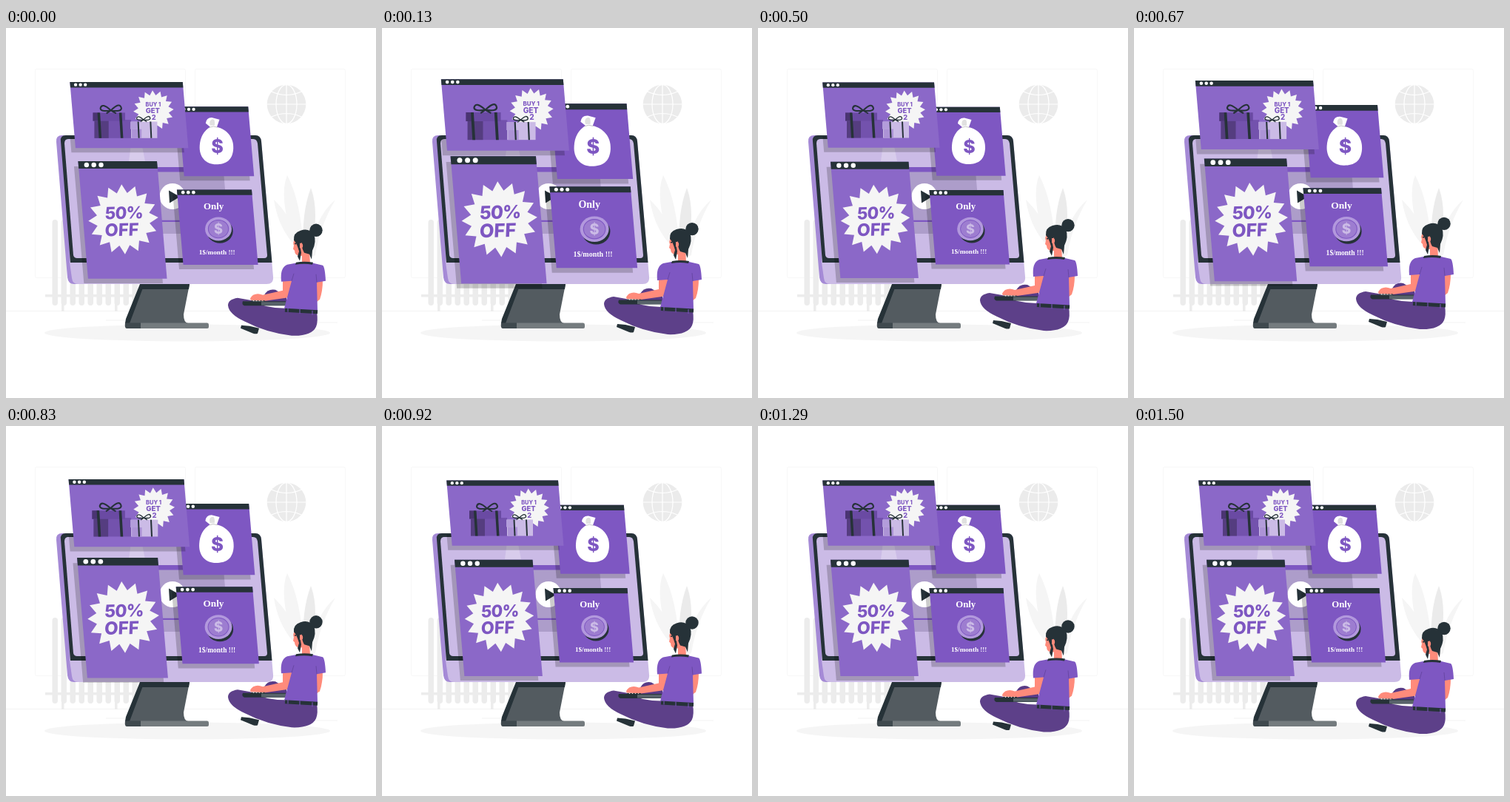
An HTML page for the animation above (1540 ms loop, 500x500 px).

```html
<!DOCTYPE html>
<html lang="en">
<head>
<meta charset="utf-8">
<style>
  html, body { margin: 0; width: 100%; height: 100%; overflow: hidden; background: #fff; }
  svg { display: block; width: 100vw; height: 100vh; }
  .bold { font: 800 23px Inter, sans-serif; fill: #7e57c2; text-anchor: middle; }
  .serif { font: 700 12.8px "Liberation Serif", serif; fill: #fff; text-anchor: middle; }
  .dark { fill: #263238; }
  .line { fill: none; stroke: #263238; stroke-width: 2; }
</style>
</head>
<body>
<svg viewBox="0 0 500 500">
  <!-- room -->
  <g fill="none" stroke="#f7f7f7">
    <rect x="39.5" y="55.5" width="203" height="282" rx="2"/>
    <rect x="255.5" y="55.5" width="203" height="282" rx="2"/>
    <path stroke="#ebebeb" stroke-width=".6" d="M0 382.5H500M135 395h38M396 398h52"/>
  </g>
  <circle cx="379" cy="103" r="26.3" fill="#ebebeb"/>
  <g fill="none" stroke="#fff" stroke-width="1.2">
    <path d="M379 76V130M352 103H406M359 86Q379 95 399 86M359 120Q379 111 399 120"/>
    <ellipse cx="379" cy="103" rx="14" ry="26.3"/>
  </g>
  <g id="radiator" fill="#ececec"><path d="M53 360H174V363.5H53zM75 372h3.5v11H75zM147 372h3.5v11H147z"/></g>
  <path fill="#f5f5f5" d="M380 199Q368 228 389 290L402 300Q399 235 380 199zM362 232Q367 266 387 290L392 281Q384 253 362 232zM445 232Q415 258 410 310L418 307Q424 268 445 232z"/>
  <path fill="#ebebeb" d="M412 216Q399 250 402 300H412Q424 249 412 216z"/>
  <ellipse cx="245" cy="412" rx="193" ry="11.5" fill="#f5f5f5"/>

  <!-- monitor -->
  <path fill="#535b60" d="M184 346H248L240 387Q240 398 246 399H161L163 394z"/>
  <path class="dark" d="M181 346H187L167 399H161L162 393zM186 346H248L247 353H184z"/>
  <path fill="#3f494e" d="M161 398.500H182V406H163Q160 406 161 398.500z"/>
  <path fill="#747b7e" d="M182 398.500H272Q274 398.500 274 401V404Q274 406 272 406H182z"/>
  <path fill="#a58ad6" d="M76 145H98L117 346H92Q84 346 83 337L68 154Q67 145 76 145z"/>
  <path fill="#cbbbe6" d="M83 145H337Q344 145 345 153L361 336Q362 346 352 346H97Q90 346 89 338L86 317z"/>
  <path class="dark" d="M81 145H337Q344 145 345 153L359.500 317H87L74 153Q73 145 81 145z"/>
  <path fill="#cbbbe6" d="M84 150H334Q339 150 340 156L353 307Q353 311 349 311H96Q92 311 91 307L79 156Q79 150 84 150z"/>
  <path fill="#fff" opacity=".25" d="M170 150H182L188 180H166z"/>
  <path fill="#ad9dca" d="M203 194H294L301 278H210z"/>
  <path fill="#7e57c2" d="M190 188H262V194.500H190zM200 259.800H262V262H200z"/>
  <circle cx="225" cy="227.500" r="17.500" fill="#fff"/>
  <path class="dark" d="M220 219.500L235 228L221 236.500z"/>

  <g id="cards"></g>

  <!-- woman -->
  <g id="woman">
    <path fill="#583b87" d="M349 361Q354 352 364 354L379 363V375H349z"/>
    <path fill="#ff8b7b" d="M419 343L428 341Q428 356 424 367L419 371z"/>
    <path fill="#5d4089" d="M313 365Q300 367 300 375Q301 387 323 397Q352 412 386 416Q413 417 419 404Q422 397 420 384L377 379Q350 379 330 368z"/>
    <path class="dark" d="M318 402L329 403L342 406L340 413Q338 414 334 413L317 406z"/>
    <path class="dark" d="M320 369.500H378V375.500H322Q318 374 320 369.500z"/>
    <path fill="#58636a" d="M345 370.500H378V375H345z"/>
    <path fill="#ff8b7b" d="M374 341H387L386 358Q386 364 378 365L350 369L331 368Q328 366 334 361Q340 358 347 361L374 355z"/>
    <path class="line" style="stroke-width:1;stroke-dasharray:3 1" d="M331 369H350"/>
    <path fill="#ff8b7b" d="M390 286Q387 291 389 294L388 299L390 301Q390 309 400 308V319H411L410 298L402 280z"/>
    <path fill="#7e57c2" d="M391 318H415L428 321Q431 323 432 342L420 344L421 384L376 379L386 342L372 343Q370 324 380 320z"/>
    <path fill="none" stroke="#63439c" stroke-width=".8" d="M386 342L389 332M420 344L419 333"/>
    <path class="dark" d="M392 317Q403 315 415 317L414 320Q403 318 391 320z"/>
    <path class="line" style="stroke-width:5" d="M377 381.500L421 384"/>
    <path fill="none" stroke="#7e57c2" d="M381 379V384M397 380V386M414 382V388"/>
    <circle class="dark" cx="419" cy="273.500" r="8.700"/>
    <path class="dark" d="M389 287Q388 277 398 274Q409 270 416 279Q420 289 414 301L413 313L410 306L403 304Q399 297 400 290L397 293L399 304L397 315L394 309L396 302Q393 291 389 287z"/>
    <path fill="#ff8b7b" d="M397 291Q402 290 401 296Q399 300 397 297z"/>
    <path class="dark" d="M390 291h2v1.500h-2z"/>
  </g>
</svg>
<script>
const byId = id => document.getElementById(id);
const SLANT = 0.085;

const pane = (x, y, w, h, fill) =>
  `<path fill="${fill}" d="M${x} ${y}h${w}l${SLANT * h} ${h}h${-w}z"/>`;

const rect = (x, y, w, h, fill) =>
  `<rect x="${x}" y="${y}" width="${w}" height="${h}" fill="${fill}"/>`;

const text = (s, x, y, size, cls = 'bold', style = '') =>
  `<text class="${cls}" x="${x}" y="${y}" style="font-size:${size}px;${style}">${s}</text>`;

function burst(cx, cy, radius, spikes = 16) {
  const points = Array.from({ length: spikes * 2 }, (_, i) => {
    const a = i * Math.PI / spikes - Math.PI / 2 - 0.05, r = radius * (i % 2 ? 0.76 : 1);
    return [cx + r * Math.cos(a), cy + r * Math.sin(a)];
  });
  return `<polygon fill="#f5f5f5" points="${points}"/>`;
}

const bow = (x, y, k) => `<path class="line" transform="translate(${x} ${y}) scale(${k})"
  d="M0 0Q-12-11-14-3Q-14 2 0 0Q12-12 14-3Q14 2 0 0L-6 4M0 0L7 4"/>`;

function card({ x, y, w, h, head, gap, fill, content }) {
  const top = Math.max(y + 7, 147);
  const shadowX = x - 6 + SLANT * (top - y);
  const dots = [0, 1, 2].map(i =>
    `<circle cx="${x + gap * (i + 1.17)}" cy="${y + head / 2}" r="${gap * 0.33}" fill="#fff"/>`);
  return '<g>' + pane(shadowX, top, w, y + h + 6 - top, 'rgba(0,0,0,.2)')
    + pane(x, y, w, h, fill) + pane(x, y, w, head, '#263238') + dots.join('') + content + '</g>';
}

const gifts =
  rect(120, 124, 49, 24.5, '#7352ad') + rect(118, 114.5, 43, 11, '#6a4aa3')
  + rect(118, 114.5, 9, 11, '#4a3472') + rect(120, 125.5, 19, 23, '#553d80')
  + '<path class="dark" d="M124 114.500h3.500l2 34h-3.500zM153 114.500h3.500l2 34h-3.500z"/>'
  + bow(142, 111.5, 1);
const smallGift =
  rect(169, 126.5, 35, 22, '#cbbbe6') + rect(168, 126.5, 10, 10, '#b39ddb')
  + rect(170, 136.5, 13, 12, '#ac93d6')
  + '<path class="dark" d="M177.500 126.500h2l1 22h-2zM194 126.500h2l1 22h-2z"/>'
  + bow(185.5, 124, 0.65);
const bag =
  `<path fill="#fff" d="M276 134L270 129Q271 121 279 121.500L288.500 124L285 134
    C298 137 308 148 307 163C306 179 297 184 284 184C270 184 261 174 262 159Q263 142 276 134z"/>
   <path fill="#e0e0e0" d="M276 132Q274 126 278 124Q283 122 282 132z"/>
   <path fill="none" stroke="#bbb" stroke-width=".8" d="M275 134.500Q280 132 286 134.500"/>`
  + text('$', 285.5, 168.5, 25);
const coin =
  `<ellipse class="dark" cx="289" cy="274.500" rx="17.500" ry="16"/>
   <ellipse cx="287" cy="271.500" rx="17.800" ry="15.800" fill="#b298dd"/>
   <ellipse cx="287" cy="271.500" rx="13.500" ry="12" fill="#9d7dd0" stroke="#7e57c2"/>`
  + text('$', 287, 278, 18, 'bold', 'fill:#cbbbe6');
const discount = `<g transform="translate(158 260) rotate(-1.500) skewX(-4) translate(-158 -260)">`
  + text('50%', 159, 258, 22.6, 'bold', 'letter-spacing:-.9px')
  + text('OFF', 157, 280.7, 23.2) + '</g>';

const cards = [
  { x: 233.3, y: 106.7, w: 93.5, h: 93, head: 7.2, gap: 6.5, fill: '#7e57c2', center: [287, 154], content: bag },
  { x: 87.2, y: 73.5, w: 150.8, h: 88.3, head: 7.3, gap: 6.5, fill: '#8b68c8', center: [166, 120],
    content: gifts + burst(199, 111.5, 27) + smallGift + text('BUY 1', 198.5, 106.3, 7.3)
      + text('GET', 198, 115.4, 9.3) + text('2', 199.3, 124, 9.2) },
  { x: 98, y: 180.8, w: 105.5, h: 157.2, head: 10, gap: 9.7, fill: '#8b68c8', center: [156, 261],
    content: burst(158.5, 258.5, 46.8) + discount },
  { x: 231.5, y: 219, w: 100, h: 100.5, head: 7.3, gap: 7, fill: '#7e57c2', center: [286, 269],
    content: text('Only', 280.7, 245, 12.8, 'serif') + coin + text('1$/month !!!', 285.2, 305.2, 9.15, 'serif') }
];

byId('cards').innerHTML = cards.map(card).join('');
const cardNodes = [...byId('cards').children];
for (let i = 0; i < 10; i++)
  byId('radiator').innerHTML += `<rect x="${62.5 + i * 12}" y="259" width="7.500" height="116" rx="3.700"/>`;

const LOOP = 1540, POSES = 37;
const beats = [[0, 1], [0.1, 1.1], [0.3, 1], [0.4, 1], [0.5, 1.1], [0.6, 1], [1, 1]];

function beat(p) {
  const i = Math.max(1, beats.findIndex(b => p <= b[0]));
  const [p0, a] = beats[i - 1], [p1, b] = beats[i];
  return a + (b - a) * (p - p0) / (p1 - p0);
}

function draw(now) {
  // 24 poses a second, each held until the next
  const pose = Math.floor((now % LOOP + 5) * POSES / LOOP) % POSES;
  const p = Math.min(1, (pose * 1000 / 24 + 16) / 1500);
  const scale = beat(p);
  cards.forEach(({ center: [x, y] }, i) => cardNodes[i].setAttribute('transform',
    `translate(${x} ${y}) scale(${scale}) translate(${-x} ${-y})`));
  byId('woman').setAttribute('transform', `translate(0 ${-10 * (1 - Math.abs(2 * p - 1))})`);
}

const start = performance.now();
function tick() {
  draw(performance.now() - start);
  requestAnimationFrame(tick);
}
tick();
</script>
</body>
</html>
```
